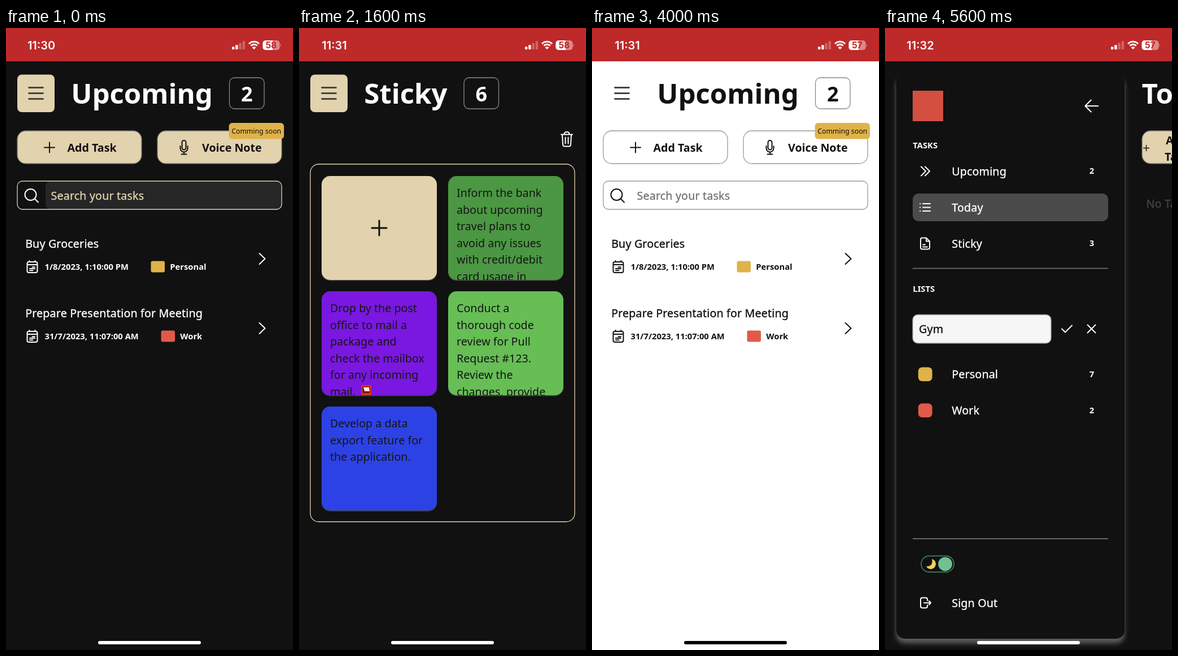
These frames come from a looping animation (508 px wide and 1101 px high, 6.4 s). An HTML page:

```html
<!DOCTYPE html>
<html lang="en">
<head>
<meta charset="utf-8">
<title>Task app tour</title>
<style>
  html, body { margin: 0; width: 100%; height: 100%; overflow: hidden; background: #111; }
  #stage { display: block; width: 100%; height: 100%; }
  text { font-family: "Noto Sans", sans-serif; fill: currentColor; white-space: pre; }
  .medium { stroke: currentColor; stroke-width: .35px; letter-spacing: .008em; }
  .medium tspan { stroke: none; letter-spacing: 0; }
  .clock { font-family: Inter, sans-serif; }
  .line { fill: none; stroke: currentColor; stroke-linecap: round; stroke-linejoin: round; }
  .scene { visibility: hidden; animation: show 6400ms step-end infinite; }
  filter { color-interpolation-filters: sRGB; }
  @keyframes show {
    0% { visibility: visible; }
    12.5%, 100% { visibility: hidden; }
  }
</style>
</head>
<body>
<svg id="stage" viewBox="0 0 508 1101" xmlns="http://www.w3.org/2000/svg">
  <defs>
    <linearGradient id="dropZone">
      <stop offset="0" stop-color="#111"/>
      <stop offset=".5" stop-color="#ea4f3f"/>
      <stop offset="1" stop-color="#111"/>
    </linearGradient>
    <linearGradient id="header" x2="1" y2=".15">
      <stop offset=".4" stop-color="#181818"/>
      <stop offset=".85" stop-color="#232323"/>
    </linearGradient>
    <filter id="lightShadow" x="-10%" y="-5%" width="120%" height="110%" color-interpolation-filters="sRGB">
      <feDropShadow dx="0" dy="8" stdDeviation="4" flood-color="#000" flood-opacity=".48"/>
    </filter>
    <filter id="darkShadow" x="-10%" y="-5%" width="120%" height="110%" color-interpolation-filters="sRGB">
      <feDropShadow dx="0" dy="8" stdDeviation="4" flood-color="#fff" flood-opacity=".32"/>
    </filter>
    <filter id="cardShadow" x="-10%" y="-5%" width="120%" height="110%" color-interpolation-filters="sRGB">
      <feDropShadow dx="0" dy="4" stdDeviation="2" flood-color="#fff" flood-opacity=".25"/>
    </filter>
  </defs>
</svg>
<script>
const RED = '#be2929', TAN = '#e2d2ae', GOLD = '#e0b24a', CORAL = '#e15a49';
const BODY = 19.67, SMALL = BODY * .75, TITLE = BODY * 2.5;

const dark = { bg: '#111', fg: '#fff', button: TAN, panel: TAN, edge: '#777', badgeEdge: '#8a8a8a',
  input: '#262626', hint: TAN, active: '#4b4b4b', rule: '#777', shadow: 'darkShadow', home: '#fff' };
const light = { bg: '#fff', fg: '#111', button: '#fff', panel: '#999', edge: '#999', badgeEdge: '#8a8a8a',
  input: '#fff', hint: '#757575', active: '#d7d7d7', rule: '#c4c4c4', shadow: 'lightShadow', home: '#000' };

// Text is placed by the middle of its capitals; weight 500 is a regular face with a hairline outline.
const text = (x, cy, label, { size = BODY, weight = 500, color = 'currentColor', anchor = 'start', cls = '' } = {}) =>
  `<text class="${cls} ${weight === 500 ? 'medium' : ''}" x="${x}" y="${cy + size * .357}" font-size="${size}"
    font-weight="${weight === 500 ? 400 : weight}" text-anchor="${anchor}" style="color:${color}">${label}</text>`;
const small = (x, cy, label, opts) => text(x, cy, label, { size: SMALL, weight: 700, ...opts });
const title = (x, cy, label) => text(x, cy, label, { size: TITLE, weight: 700 });
const rect = (x, y, w, h, r, fill, extra = '') =>
  `<rect x="${x}" y="${y}" width="${w}" height="${h}" rx="${r}" fill="${fill}" ${extra}/>`;
const border = (color, width = 1.3) => `stroke="${color}" stroke-width="${width}"`;
const rule = (y, color) => `<path d="M49 ${y}H395" stroke="${color}" stroke-width="1.3"/>`;
const clip = (x, y, w, h, content) => `<svg x="${x}" y="${y}" width="${w}" height="${h}">${content}</svg>`;

const shapes = {
  menu: 'M-12.5-10H12.5M-12.5 0H12.5M-12.5 10H12.5',
  plus: 'M-9 0H9M0-9V9',
  cross: 'M-7-7L7 7M7-7L-7 7',
  check: 'M-9 0L-3 6L9-6',
  chevron: 'M-5-9.5L5 0L-5 9.5',
  arrow: 'M11.5 0H-11.5M-1-10.5L-11.5 0L-1 10.5',
  search: 'M8.5-1.5A10 10 0 1 1-11.5-1.5A10 10 0 1 1 8.5-1.5M5.8 5.8L12 12',
  mic: 'M-3.5-8.5A3.5 3.5 0 0 1 3.5-8.5V1A3.5 3.5 0 0 1-3.5 1ZM-6.5-2V2A6.5 6.5 0 0 0 6.5 2V-2M0 8.5V12.5M-4.5 12.5H4.5',
  calendar: 'M-6-9H6Q9-9 9-6V7Q9 10 6 10H-6Q-9 10-9 7V-6Q-9-9-6-9ZM-9-4H9M-5-9.5V-11M5-9.5V-11M-4.5 6.2H1M-4.5 3H4.5M0 .2H4.5',
  trash: 'M-10-8.5H10M-4.5-8.5Q-4.5-13 0-13Q4.5-13 4.5-8.5M-8-8.5L-7 9Q-6.7 12.5-4 12.5H4Q6.7 12.5 7 9L8-8.5M-2.5-3.5V7.5M2.5-3.5V7.5',
  upcoming: 'M-7-8L1 0L-7 8M0-8L8 0L0 8',
  today: 'M-4-6.5H9M-4 0H9M-4 6.5H9M-9-6.5H-8.6M-9 0H-8.6M-9 6.5H-8.6',
  sticky: 'M2-10H-5Q-8-10-8-7V7Q-8 10-5 10H5Q8 10 8 7V-4ZM2-10V-4H8M-4 2H0M-4 6H4',
  exit: 'M4-4V-6Q4-9 1-9H-5Q-8-9-8-6V6Q-8 9-5 9H1Q4 9 4 6V4M-2 0H10M7-3.2L10 0L7 3.2'
};
const icon = (name, x, y, { width = 2, color = 'currentColor', scale = 1 } = {}) =>
  `<path class="line" d="${shapes[name]}" transform="translate(${x} ${y}) scale(${scale})"
    style="stroke:${color};stroke-width:${width / scale}"/>`;

function statusBar(time, charge) {
  const bars = [5, 8, 11.5, 15].map((h, i) =>
    rect(400 + i * 6.2, 38 - h, 4.4, h, 1.2, '#fff', `opacity="${i < 2 ? 1 : .28}"`)).join('');
  const arc = r => `M${439 - r * .72} ${37 - r * .72}A${r} ${r} 0 0 1 ${439 + r * .72} ${37 - r * .72}`;
  return rect(0, 0, 508, 59, 0, RED) +
    text(62.5, 31, time, { size: 20, weight: 600, anchor: 'middle', color: '#fff', cls: 'clock' }) + bars +
    `<path d="${arc(12.5)}${arc(7.8)}" fill="none" stroke="#fff" stroke-width="2.9"/>
     <path d="M439 38L435.6 34.4Q439 31.5 442.4 34.4Z" fill="#fff"/>` +
    rect(454.5, 22, 30, 17, 5, '#fff', 'opacity=".45"') +
    clip(454, 22, 18, 17, rect(.5, 0, 30, 17, 5, '#fff')) +
    '<path d="M485.5 28Q488 30.5 485.5 33Z" fill="#fff" opacity=".5"/>' +
    text(469.3, 30.6, charge, { size: 15.5, weight: 700, anchor: 'middle', color: RED, cls: 'clock' });
}

const home = color => rect(163, 1085, 182, 6, 3, color);

const pageTop = (theme, name, count, x) =>
  rect(20, 82.5, 66, 66.5, 8, theme.button) + icon('menu', 53, 115.5, { width: 2.8, color: '#444' }) +
  title(115.3, 116.5, name) +
  rect(x, 88, 61.5, 55, 9, 'none', border(theme.badgeEdge)) +
  text(x + 30.7, 117, count, { size: 36, weight: 700, anchor: 'middle' });

const task = (y, name, date, listX, color, list) =>
  text(34.2, y, name) + icon('calendar', 46.5, y + 41.5) + small(68.5, y + 41, date) +
  rect(listX, y + 31, 24.5, 20, 3, color) + small(listX + 33.8, y + 41, list) + icon('chevron', 453.5, y + 27);

function upcomingPage(theme) {
  const ink = { weight: 700, color: '#111' };
  return pageTop(theme, 'Upcoming', 2, 395.5) +
    rect(20, 182, 220, 58, 15, theme.button, border(theme.edge)) +
    icon('plus', 77, 211.5, { color: '#111' }) + text(108.5, 211.5, 'Add Task', ink) +
    rect(268, 182, 220, 58, 15, theme.button, border(theme.edge)) +
    icon('mic', 315, 211, { color: '#111' }) + text(347, 211.5, 'Voice Note', ink) +
    rect(394.5, 168, 97.5, 28.5, 6, GOLD) +
    text(443.2, 182.5, 'Comming soon', { size: BODY * .625, weight: 400, color: '#111', anchor: 'middle' }) +
    rect(70, 271, 418, 50, 9, theme.input) + rect(20, 271, 468, 50, 9, 'none', border(theme.panel)) +
    icon('search', 45, 296.5) + text(79.5, 297, 'Search your tasks', { color: theme.hint }) +
    task(381.5, 'Buy Groceries', '1/8/2023, 1:10:00 PM', 256.5, GOLD, 'Personal') +
    task(504.5, 'Prepare Presentation for Meeting', '31/7/2023, 11:07:00 AM', 274.5, CORAL, 'Work');
}

function note(x, y, color, lines = []) {
  const words = lines.map((line, i) => text(15, 30 + i * 29.5, line, { weight: 400, color: '#151515' })).join('');
  return rect(x, y + 1.5, 204, 184, 15, '#777', 'opacity=".5"') + rect(x, y, 204, 184, 15, color) + clip(x, y, 204, 184, words);
}
const exportNote = ['Develop a data', 'export feature for', 'the application.'];

const postbox = (x, y) => rect(x, y, 18, 18, 2, '#dc2f20') + rect(x + 2.5, y + 3, 13, 11, 1, '#6d1712') +
  `<path d="M${x + 4} ${y + 4}H${x + 14}L${x + 15} ${y + 11}H${x + 6}Z" fill="#f4eeee"/>`;

const board = (y, height) =>
  rect(20, y, 468, height, 15, 'none', border(TAN)) +
  note(40, y + 21, TAN) + icon('plus', 142, y + 113, { width: 3, color: '#111', scale: 1.45 }) +
  note(264, y + 21, '#4b9743', ['Inform the bank', 'about upcoming', 'travel plans to', 'avoid any issues', 'with credit/debit', 'card usage in']) +
  note(40, y + 225, '#7a17e0', ['Drop by the post', 'office to mail a', 'package and', 'check the mailbox', 'for any incoming', 'mail.']) +
  postbox(110, y + 391) +
  note(264, y + 225, '#66be55', ['Conduct a', 'thorough code', 'review for Pull', 'Request #123.', 'Review the', 'changes, provide']);

const stickyPage = () => pageTop(dark, 'Sticky', 6, 292) + icon('trash', 474, 197) +
  board(241, 633) + note(40, 670, '#2d42e5', exportNote);

const draggingPage = () => pageTop(dark, 'Sticky', 6, 292) + icon('cross', 474, 197, { width: 2.5 }) +
  rect(20, 241, 468, 98, 0, 'url(#dropZone)') +
  text(254, 290.5, 'Drag and drop here to delete', { weight: 400, anchor: 'middle' }) +
  board(369, 429) + note(75, 135.5, '#ea4f3f', exportNote);

function toggle(theme) {
  const isDark = theme === dark;
  const rays = [...Array(8)].map((_, i) => `<path d="M0-6.5V-9" transform="rotate(${i * 45})"/>`).join('');
  const sun = `<g transform="translate(105.5 949)" fill="none" stroke="#eda02c" stroke-width="2"
    stroke-linecap="round"><circle r="4.3"/>${rays}</g>`;
  const moon = '<path d="M83 940A9 9 0 1 1 73 953Q86 953 83 940Z" fill="#f6cf55"/>';
  return rect(64, 934.5, 58, 28.5, 14.2, 'none', border(isDark ? '#3b7556' : '#a9dcc0', 1.8)) +
    (isDark ? moon : sun) + `<circle cx="${isDark ? 106.5 : 79.7}" cy="948.8" r="12.4" fill="#70c092"/>`;
}

function sidebar(theme, { active, stickies, lists, adding }) {
  const label = (y, name, count = '') => text(118.2, y, name) + small(366, y - .5, count, { anchor: 'middle' });
  const entries = [['Upcoming', 2], ['Today'], ['Sticky', stickies]];
  const nav = entries.map(([name, count], i) => {
    const y = 253.5 + i * 64;
    return (name === active ? rect(49, y - 24.5, 346, 49, 10, theme.active) : '') +
      icon(name.toLowerCase(), 71, y) + label(y, name, count);
  }).join('');
  const listTop = adding ? 613 : 514.5;
  const rows = lists.map(([name, color, count], i) => {
    const y = listTop + i * 64;
    return rect(58.8, y - 12.5, 24.8, 24.8, 7, color) + label(y, name, count);
  }).join('');
  const entry = adding
    ? rect(49, 507.5, 245, 50.5, 9, '#f6f6f6', border('#999')) + text(60, 533, adding, { color: '#111' }) +
      icon('check', 322, 532.5) + icon('cross', 365.5, 532.5)
    : icon('plus', 383, 462);
  return rect(20, 79, 404, 1002, 15, theme.bg, `filter="url(#${theme.shadow})"`) +
    rect(49, 111, 54, 54, 0, '#d34f40') + icon('arrow', 365.8, 138) +
    small(49.3, 207.5, 'TASKS') + nav + rule(425.5, theme.rule) +
    small(49.3, 461.5, 'LISTS') + entry + rows + rule(904, '#858585') +
    toggle(theme) + icon('exit', 71, 1017.5) + label(1018, 'Sign Out');
}

const sideTitle = name => title(454.5, 116.5, name);
const sideButton = () => rect(455, 182, 80, 58, 15, TAN, border('#777')) +
  icon('plus', 462.5, 212.5, { width: 1.4, color: '#111', scale: .55 }) +
  text(497, 198.5, 'Add', { weight: 700, color: '#111' }) + text(495, 228, 'Task', { weight: 700, color: '#111' });

const upcomingEdge = () => sideTitle('Upcoming') + sideButton() +
  rect(455, 271, 120, 50, 9, 'none', border(TAN)) + rect(505, 271, 70, 50, 9, '#262626') + icon('search', 480, 296.5) +
  text(469, 381.5, 'Buy') + icon('calendar', 481, 423) + text(469, 504.5, 'Prepare') + icon('calendar', 481, 546);

const todayEdge = () => sideTitle('Today') + sideButton() + text(462.5, 310.5, 'No Tasks', { color: '#444' });

const stickyEdge = () => '<path d="M466 188.5H482L480 209H468Z" fill="#bbb"/>' + icon('trash', 474, 197) +
  clip(0, 0, 489, 1101,
    sideTitle('Sticky') + rect(455, 241, 46, 429, 15, 'none', border('#999')) +
    icon('plus', 475, 354, { width: 3, scale: 1.45 }) + rect(475, 466, 204, 184, 15, '#7a17e0'));

const welcome = () =>
  rect(20, 79, 468, 156, 15, 'url(#header)') +
  title(50, 136.5, 'Tevu') +
  small(165, 168, 'by velorin', { weight: 400, color: '#999', anchor: 'end' }) +
  rect(385.5, 103.5, 78, 78, 0, '#d34f40') +
  rect(20, 264, 468, 782, 15, '#000', 'filter="url(#cardShadow)"') +
  title(38.5, 527, 'Productive Mind') +
  ['With only the features you need, <tspan font-weight="700">Tevu App</tspan> is',
   'customised for individual seeking a stress-', 'free way to saty focused on their goals,', 'projects and tasks.']
    .map((line, i) => text(39.5, 598 + i * 29.5, line)).join('') +
  rect(39.5, 720, 429, 59, 15, GOLD) + text(254, 750, 'Get Started', { weight: 700, color: '#111', anchor: 'middle' }) +
  small(254, 810, 'Already have an account? Sign in', { anchor: 'middle' });

const lists = [['Personal', GOLD, 7], ['Work', CORAL, 2], ['Morvel', '#2b5a4b', 1]];
const black = { ...dark, bg: '#000', home: '#dcdcdc' };
const scenes = [
  [dark, '11:30', 58, upcomingPage(dark)],
  [dark, '11:31', 58, upcomingEdge() + sidebar(dark, { active: 'Upcoming', stickies: 6, lists })],
  [dark, '11:31', 58, stickyPage()],
  [dark, '11:31', 57, draggingPage()],
  [{ ...light, home: '#c4c4c4' }, '11:31', 57, stickyEdge() + sidebar(light, { active: 'Sticky', stickies: 3, lists })],
  [light, '11:31', 57, upcomingPage(light)],
  [black, '11:32', 57, welcome()],
  [dark, '11:32', 57, todayEdge() + sidebar(dark, { active: 'Today', stickies: 3, lists: lists.slice(0, 2), adding: 'Gym' })]
];

document.getElementById('stage').insertAdjacentHTML('beforeend', scenes.map(([theme, time, charge, content], i) =>
  `<g class="scene" style="color:${theme.fg};animation-delay:${i * 800 - 6400}ms">
    ${rect(0, 0, 508, 1101, 0, theme.bg)}${content}${statusBar(time, charge)}${home(theme.home)}</g>`).join(''));
</script>
</body>
</html>
```
